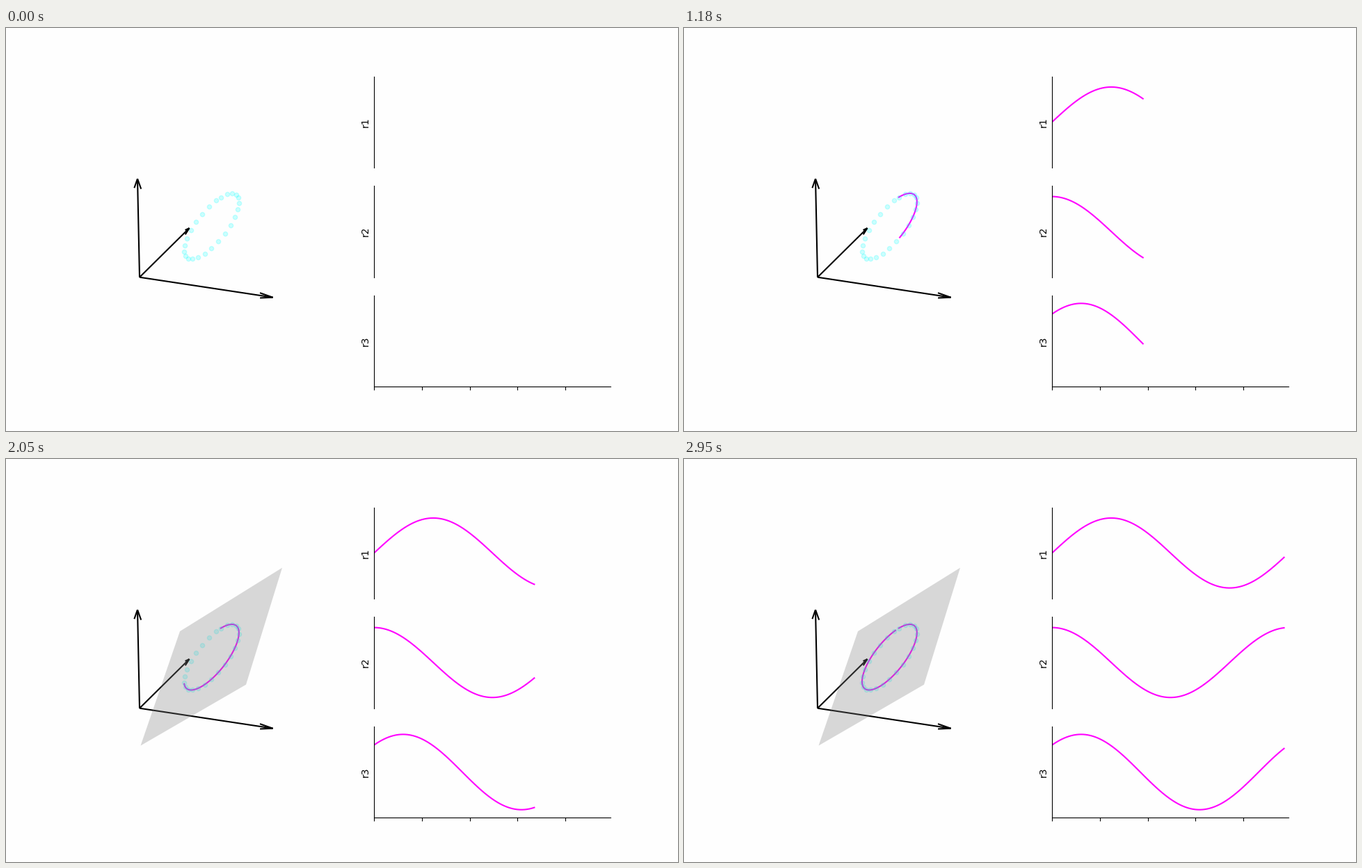
Write a matplotlib script that moves like this. It is 966 by 580 pixels and loops after 2.98 s.

```python
import numpy as np
import matplotlib.pyplot as plt
from matplotlib.animation import FuncAnimation
from matplotlib.collections import LineCollection

W, H, DPI = 966, 580, 100
LOOP, TICK = 2980, 10           # ms
FIRST, STEP = 70, 30            # hold of the empty view, then ms per sample
N = 100
PLANE_AT = 50                   # sample at which the plane shows up
BG = "#fefefe"

theta = np.linspace(0, 2 * np.pi, N)

fig = plt.figure(figsize=(W / DPI, H / DPI), dpi=DPI, facecolor=BG)

# Left view, in stage pixels
view = fig.add_axes([0, 0, 1, 1])
view.set(xlim=(0, W), ylim=(H, 0))
view.axis("off")

ring_x = 295.4 + 13.4 * np.cos(theta) + 37.1 * np.sin(theta)
ring_y = 285.2 - 41.7 * np.cos(theta) - 22.3 * np.sin(theta)


def arrow(tip, barb_a, barb_b):
    return [[(192, 358.7), tip], [barb_a, tip], [barb_b, tip]]


arrows = (arrow((383.5, 387.7), (365, 381.2), (365.1, 388.5))
          + arrow((263.5, 288), (257.5, 290.9), (257.7, 297.2))
          + arrow((189, 217), (184.4, 230.2), (194.2, 231.6)))

trail, = view.plot([], [], color="magenta", lw=1.5, zorder=2)
view.scatter(ring_x[::4], ring_y[::4], s=20, color="cyan", lw=1,
             alpha=0.2, zorder=3)
view.add_collection(LineCollection(arrows, colors="black", linewidths=1.5,
                                   zorder=4))
plane, = view.fill([250, 397, 345, 193.5], [248, 156.5, 324.7, 412.5],
                   color="gray", alpha=0.3, lw=0, zorder=5)

# Right plots
signals = [np.sin(theta), np.cos(theta), 1.077 * np.cos(theta - 0.77)]
curves = []
for row, signal in enumerate(signals):
    ax = fig.add_subplot(3, 2, 2 * row + 2, facecolor="none")
    ax.set(xlim=(0, N - 1), ylim=(-1.305, 1.305), yticks=[],
           ylabel=f"r{row + 1}")
    ax.spines[["top", "right"]].set_visible(False)
    if row < 2:
        ax.spines["bottom"].set_visible(False)
        ax.set_xticks([])
    else:
        ax.set_xticks(range(0, N, 20), labels=[])
    curve, = ax.plot([], [], color="magenta", lw=1.5)
    curves.append((curve, signal))


def update(frame):
    t = frame * TICK
    i = 0 if t < FIRST else 1 + (t - FIRST) // STEP
    n = i + 1 if i else 0
    trail.set_data(ring_x[:n], ring_y[:n])
    for curve, signal in curves:
        curve.set_data(np.arange(n), signal[:n])
    plane.set_visible(i >= PLANE_AT)
    return [trail, plane] + [curve for curve, _ in curves]


anim = FuncAnimation(fig, update, frames=LOOP // TICK, interval=TICK,
                     repeat=True, repeat_delay=0, blit=False)
plt.show()
```
